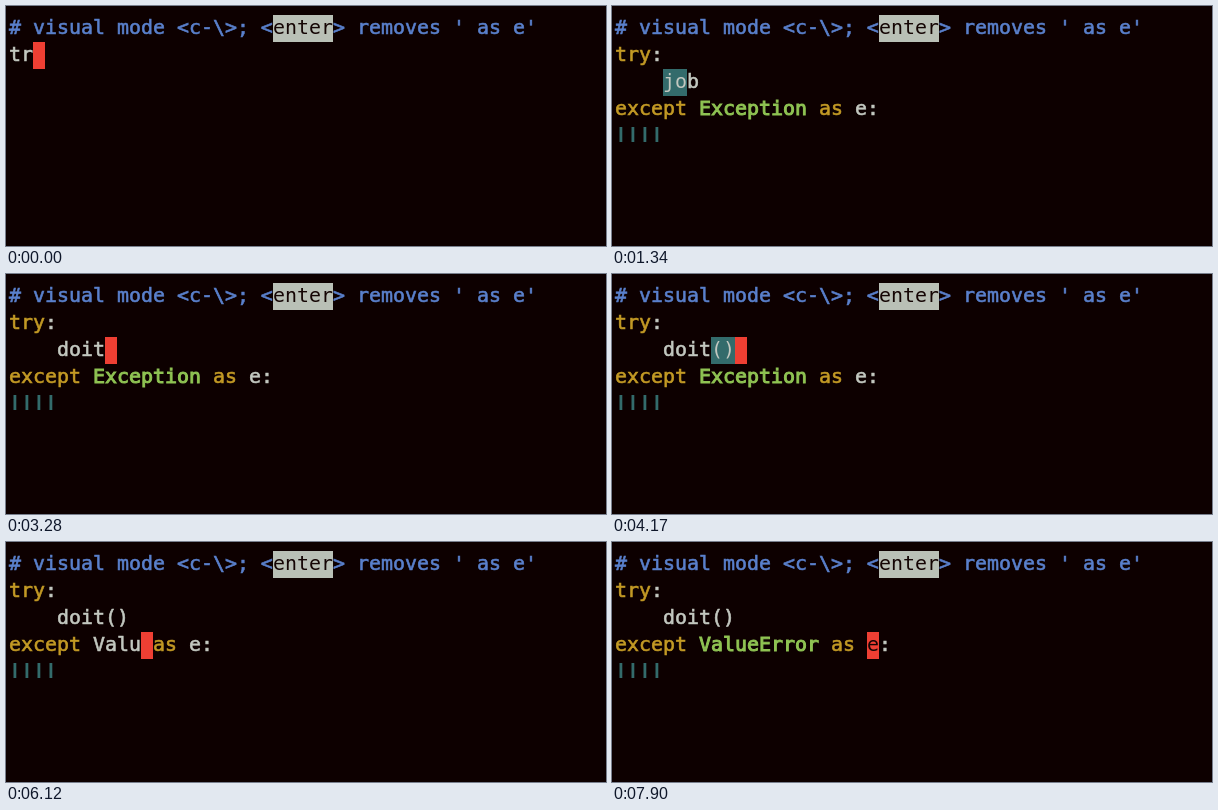
These frames come from a looping animation (600 by 240 pixels, 8 s). An HTML page:

```html
<!DOCTYPE html>
<html lang="en">
<head>
<meta charset="utf-8">
<title>Snippet expansion</title>
<style>
  html, body { margin: 0; width: 100%; height: 100%; overflow: hidden; background: #0d0000; }
  svg { display: block; width: 600px; height: 240px; }
  text { font: 19.93px "DejaVu Sans Mono", "Noto Sans Mono", monospace; white-space: pre; stroke-width: .6px; }
  .note { fill: #5a80cc; stroke: #5a80cc; }
  .plain { fill: #c3c8c0; stroke: #c3c8c0; }
  .key { fill: #c39a25; stroke: #c39a25; }
  .type { fill: #8fc353; stroke: #8fc353; stroke-width: 1px; }
  .sel { fill: #c3c8c0; }
  .dark { fill: #140504; }
  .teal { fill: #336b6b; }
  .pale { fill: #b9c0b6; }
  .red { fill: #ee3f33; }
</style>
</head>
<body>
<svg id="screen" viewBox="0 0 600 240"></svg>
<script>
const LOOP = 8000, LEFT = 3, TOP = 9, CELL = 12, ROW = 27, BASE = 19;
const screen = document.getElementById('screen');

// Each step changes part of the editor state; cur is [column, row].
const steps = [
  [0, { head: 'tr', cur: [2, 1], open: false }],
  [150, { head: 'try', cur: [3, 1] }],
  [740, { cur: null }],
  [890, { open: true, body: 'job', pick: 'body', error: 'Exception', known: true, cur: [6, 2] }],
  [1340, { cur: null }],
  [2380, { cur: [6, 2] }],
  [2830, { body: 'do', pick: '', cur: [6, 2] }],
  [3130, { body: 'doi', cur: [7, 2] }],
  [3280, { body: 'doit', cur: [8, 2] }],
  [3570, { body: 'doit(  )', cur: [10, 2] }],
  [3720, { body: 'doit()' }],
  [4170, { pick: 'parens' }],
  [4770, { pick: 'error', cur: [15, 3] }],
  [5070, { pick: '', known: false, ...typed('V') }],
  [5820, typed('Va')],
  [6120, typed('Valu')],
  [6260, typed('Value')],
  [6560, typed('ValueE')],
  [6710, typed('ValueEr')],
  [6860, typed('ValueErr')],
  [7010, typed('ValueErro')],
  [7300, { known: true, ...typed('ValueError') }],
  [7900, { cur: [21, 3] }]
];

function typed(error) {
  return { error, cur: [7 + error.length, 3] };
}

function block(col, row, n, cls) {
  return `<rect class="${cls}" x="${LEFT + col * CELL}" y="${TOP + row * ROW}" width="${n * CELL}" height="${ROW}"/>`;
}

function word(col, row, str, cls) {
  const safe = str.replace(/</g, '&lt;').replace(/>/g, '&gt;');
  return `<text class="${cls}" x="${LEFT + col * CELL}" y="${TOP + row * ROW + BASE}">${safe}</text>`;
}

function marked(col, row, str) {
  return block(col, row, str.length, 'teal') + word(col, row, str, 'sel');
}

function picture(s) {
  let out = word(0, 0, '# visual mode <c-\\>; <', 'note') + block(22, 0, 5, 'pale') +
    word(22, 0, 'enter', 'dark') + word(27, 0, "> removes ' as e'", 'note') +
    word(0, 1, s.head, s.head === 'try' ? 'key' : 'plain');
  let under = '';

  if (s.open) {
    out += word(3, 1, ':', 'plain');

    if (s.pick === 'body') {
      out += marked(4, 2, 'jo');
      if (s.cur) under = 'b';
      else out += word(6, 2, 'b', 'plain');
    } else if (s.pick === 'parens') {
      out += word(4, 2, 'doit', 'plain') + marked(8, 2, '()');
    } else {
      out += word(4, 2, s.body, 'plain');
    }

    out += word(0, 3, 'except', 'key');
    if (s.pick === 'error') {
      out += marked(7, 3, s.error.slice(0, -1));
      under = s.error.slice(-1);
    } else {
      out += word(7, 3, s.error, s.known ? 'type' : 'plain');
    }
    const end = 8 + s.error.length;
    out += word(end, 3, 'as', 'key');
    if (s.cur && s.cur[1] === 3 && s.cur[0] === end + 3) under = 'e';
    else out += word(end + 3, 3, 'e', 'plain');
    out += word(end + 4, 3, ':', 'plain');

    // indent guides
    for (let i = 0; i < 4; i++) {
      out += `<rect class="teal" x="${7.5 + i * CELL}" y="121" width="2.8" height="15"/>`;
    }
  }

  if (s.cur) out += block(...s.cur, 1, 'red') + word(...s.cur, under, 'dark');
  return out;
}

const state = {};
const frames = steps.map(([at, change]) => [at, picture(Object.assign(state, change))]);
const start = performance.now();
let shown = -1;

function tick(now) {
  const t = Math.max(0, now - start) % LOOP;
  let i = frames.length - 1;
  while (frames[i][0] > t) i--;
  if (i !== shown) {
    screen.innerHTML = frames[i][1];
    shown = i;
  }
  requestAnimationFrame(tick);
}
tick(start);
</script>
</body>
</html>
```
